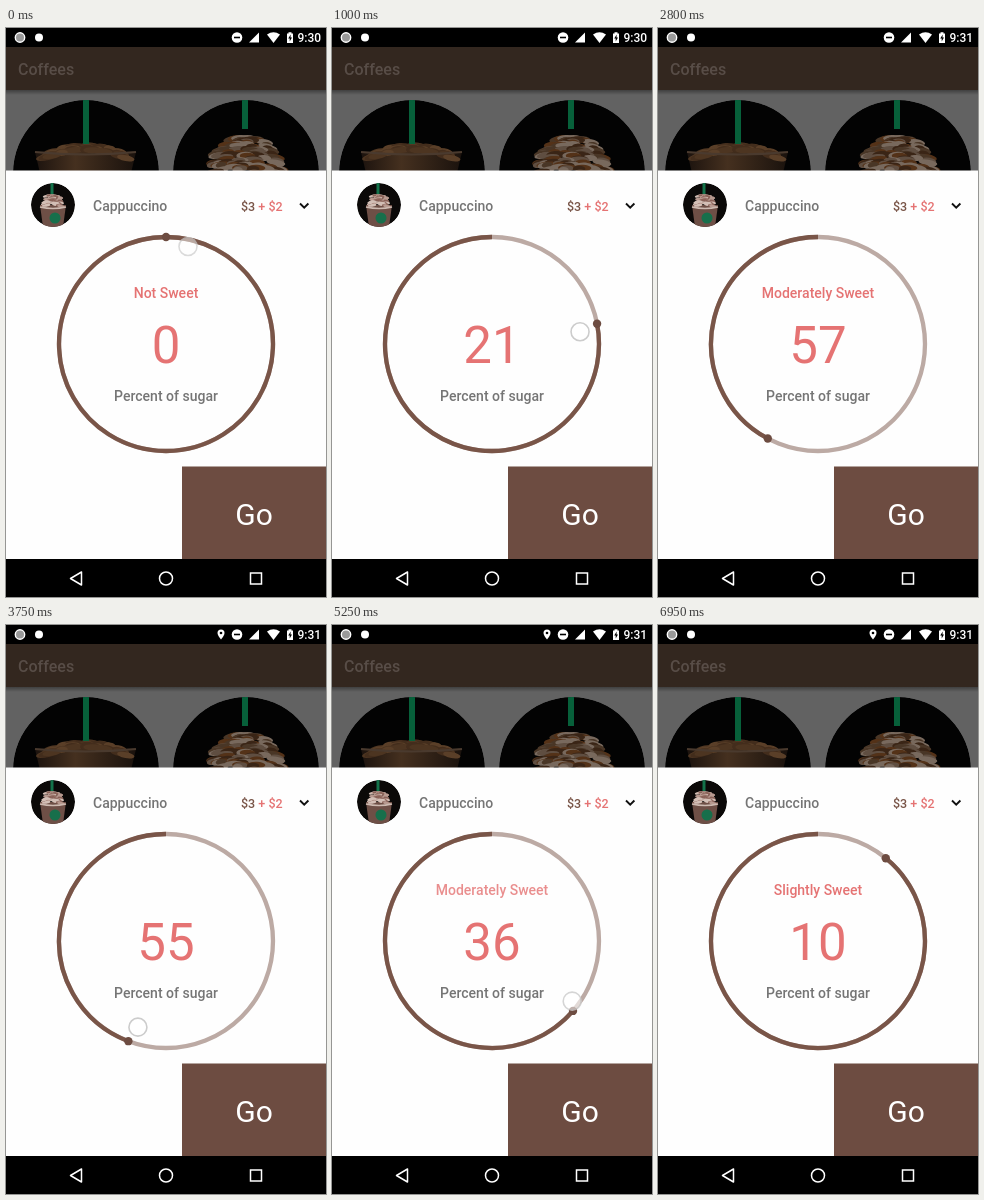
Recreate the animation shown at these times as an HTML page. Size 320 by 569 pixels, loop 8000 ms.

```html
<!DOCTYPE html>
<html lang="en">
<head>
<meta charset="utf-8">
<title>Coffee sugar dial</title>
<style>
  html, body { margin: 0; width: 100%; height: 100%; overflow: hidden; background: #000; }
  svg { display: block; width: 100vw; height: 100vh; }
  text { font-family: Roboto, "Noto Sans", sans-serif; }
  .medium { font-weight: 500; font-size: 14px; }
  .middle { text-anchor: middle; }
</style>
</head>
<body>
<svg viewBox="0 0 320 569" xmlns="http://www.w3.org/2000/svg">
  <defs>
    <clipPath id="disc"><circle r="73"/></clipPath>
    <clipPath id="smallDisc"><circle r="22"/></clipPath>
    <linearGradient id="shade" x2="0" y2="1">
      <stop stop-opacity=".35"/><stop offset="1" stop-opacity="0"/>
    </linearGradient>
    <linearGradient id="drink">
      <stop stop-color="#1c130e"/><stop offset=".4" stop-color="#45301f"/><stop offset="1" stop-color="#1a120d"/>
    </linearGradient>
  </defs>

  <!-- dimmed list -->
  <rect y="19" width="320" height="124" fill="#626262"/>
  <rect y="62" width="320" height="5" fill="url(#shade)"/>
  <rect y="19" width="320" height="43" fill="#33271f"/>
  <text x="12" y="46.5" font-size="16" font-weight="500" fill="#584d47">Coffees</text>

  <g transform="translate(80 145)" clip-path="url(#disc)">
    <circle r="73" fill="#030303"/>
    <path d="M-51 -21H50L45 0H-46Z" fill="url(#drink)"/>
    <g id="foam"></g>
    <path d="M-51 -21Q0 -16 50 -21" fill="none" stroke="#4a3a2e" stroke-width="2"/>
    <rect x="-3" y="-75" width="6" height="46" fill="#07603a"/>
  </g>
  <g transform="translate(240 145)" clip-path="url(#disc)">
    <circle r="73" fill="#030303"/>
    <g id="caramel"></g>
    <rect x="-4" y="-75" width="6" height="31" fill="#07603a"/>
  </g>

  <!-- status bar -->
  <g fill="#fff">
    <circle cx="14" cy="9.5" r="4.7" fill="#999" stroke="#fff" stroke-width="1.4"/>
    <circle cx="33" cy="9.5" r="4"/>
    <g id="pin">
      <path d="M211.500 8a3.500 3.500 0 0 1 7 0q0 2-3.500 6.500q-3.500-4.500-3.500-6.500"/>
      <circle cx="215" cy="8" r="1.300" fill="#000"/>
    </g>
    <circle cx="231" cy="9.500" r="5.300"/>
    <path d="M228 9.500h6" stroke="#000" stroke-width="1.600"/>
    <path d="M253 4.500v10h-10z"/>
    <path d="M261 6.500q6.500-4.500 13 0l-6.500 8.500z"/>
    <path d="M281 5.500h1.500v-1.200h3v1.200h1.500v9.500h-6z"/>
    <path d="M284.700 6.500l-2.500 4h1.500v3l2.300-4h-1.500z" fill="#000"/>
    <text id="clock" x="291.500" y="13.700" font-size="12" font-weight="500"></text>
  </g>

  <!-- order sheet -->
  <rect y="142.500" width="320" height="388.500" fill="#fefefe"/>
  <g transform="translate(47 177)" clip-path="url(#smallDisc)">
    <circle r="22" fill="#0b0908"/>
    <rect x="-2.500" y="-22" width="3" height="12" fill="#13724a"/>
    <path d="M-13 0H13L10 22H-10Z" fill="#6e4f46"/>
    <g id="whip"></g>
    <path d="M-13 2Q0 5 13 2" fill="none" stroke="#cdb9b0" stroke-width="1.500"/>
    <circle cx="2" cy="13" r="5.500" fill="#176f4b"/>
  </g>
  <text class="medium" x="87" y="182.700" fill="#757575">Cappuccino</text>
  <text x="235" y="182.700" font-size="12.500" font-weight="500" fill="#795548">$3 <tspan fill="#e57373">+ $2</tspan></text>
  <path d="M294 175.500l4.200 4.200 4.200-4.200" fill="none" stroke="#111" stroke-width="1.900"/>

  <!-- dial -->
  <g fill="none" stroke-width="4.300">
    <circle cx="160" cy="316" r="107" stroke="#bcaaa4"/>
    <path id="arc" stroke="#795548"/>
  </g>
  <circle id="knob" r="4.200" fill="#6d4c41"/>
  <text id="label" class="medium middle" x="160" y="269.700" fill="#e57373"></text>
  <text id="value" class="middle" x="160" y="334.500" font-size="51" fill="#e57373"></text>
  <text class="medium middle" x="160" y="372.700" fill="#757575">Percent of sugar</text>
  <rect x="176" y="438.500" width="144" height="92.500" fill="#6d4c41"/>
  <text class="middle" x="248" y="496.500" font-size="30" fill="#fff">Go</text>
  <circle id="touch" r="9" fill="#fff" fill-opacity=".7" stroke="#ccc" stroke-width="1.600"/>

  <!-- navigation bar -->
  <rect y="531" width="320" height="38"/>
  <g fill="none" stroke="#fff" stroke-width="1.500">
    <path d="M75.500 544v13l-11-6.500z" stroke-linejoin="round"/>
    <circle cx="160" cy="550.500" r="6.500"/>
    <rect x="244.500" y="545" width="11" height="11"/>
  </g>
</svg>
<script>
const LOOP = 8000, STEP = 50, LAG = 30, CX = 160, CY = 316, R = 107;
const el = id => document.getElementById(id);
const [arc, knob, label, value, touch, pin, clock] =
  ["arc", "knob", "label", "value", "touch", "pin", "clock"].map(el);

const clamp = x => Math.min(1, Math.max(0, x));
const mix = (a, b, p) => a + (b - a) * p;
const bezier = ([a, b, c, d], p) =>
  mix(mix(mix(a, b, p), mix(b, c, p), p), mix(mix(b, c, p), mix(c, d, p), p), p);

// Each drag bends the finger's angle along a Bezier curve and drifts its distance from the centre.
const drags = [
  { start: 0, end: 2700, rest: 0, curve: [12.7, 31.6, 210, 208], reach: [100, 70], before: "Not Sweet", after: "Moderately Sweet" },
  { start: 3570, end: 4420, rest: 208, curve: [208, 204, 136, 130.8], reach: [90, 93], before: "Moderately Sweet", after: "Moderately Sweet" },
  { start: 5220, end: 6770, rest: 130.8, curve: [130.8, 62.3, 39.3, 39.3], reach: [100, 112], before: "Moderately Sweet", after: "Slightly Sweet" }
];

function progress(drag, t) {
  return clamp((t - drag.start) / (drag.end - drag.start));
}

function polar(degrees, radius) {
  const a = degrees * Math.PI / 180;
  return [CX + radius * Math.sin(a), CY - radius * Math.cos(a)];
}

function place(node, [x, y]) {
  node.setAttribute("cx", x);
  node.setAttribute("cy", y);
}

// Piles up random dabs, widening from the top of the heap to its bottom.
function heap(id, { top, bottom, narrow, wide, dab, count, colours }) {
  let seed = 7;
  const random = () => (seed = seed * 16807 % 2147483647) / 2147483647;
  for (let i = 0; i < count; i++) {
    const p = i / count;
    const side = 2 * random() - 1;
    const node = document.createElementNS("http://www.w3.org/2000/svg", "ellipse");
    place(node, [side * mix(narrow, wide, Math.sqrt(p)), mix(top, bottom, p)]);
    node.setAttribute("rx", dab * (1 + random()));
    node.setAttribute("ry", dab * .6);
    node.setAttribute("fill", colours[Math.floor(random() * colours.length)]);
    node.setAttribute("transform", `rotate(${side * 12})`);
    el(id).append(node);
  }
}

heap("foam", { top: -28, bottom: -22, narrow: 28, wide: 40, dab: 5, count: 50,
  colours: ["#4d3521", "#5a3f28", "#432d1c"] });
heap("caramel", { top: -36, bottom: 4, narrow: 6, wide: 44, dab: 5, count: 130,
  colours: ["#5f4e41", "#493626", "#543218", "#78695d", "#3a2516"] });
heap("whip", { top: -10, bottom: 0, narrow: 4, wide: 9, dab: 2.2, count: 50,
  colours: ["#d3bfb6", "#b89a90", "#8a6258"] });

function draw(t) {
  const drag = drags.findLast(d => t >= d.start);
  const finger = time => bezier(drag.curve, progress(drag, time));
  const angle = mix(drag.rest, finger(t - LAG), clamp((t - drag.start) / 150));
  const [x, y] = polar(Math.max(angle, .01), R);
  arc.setAttribute("d", `M${x} ${y}A${R} ${R} 0 ${angle < 180 ? 1 : 0} 1 ${CX} ${CY - R}`);
  place(knob, [x, y]);
  value.textContent = Math.floor(angle / 3.6);

  place(touch, polar(finger(t), mix(...drag.reach, progress(drag, t))));
  touch.setAttribute("opacity", clamp(.7 + (t - drag.start) / 300) * clamp(1 - (t - drag.end) / 80));

  const fadeOut = clamp(1 - (t - drag.start) / 150);
  const fadeIn = clamp((t - drag.end + 50) / 130);
  label.textContent = fadeOut > 0 ? drag.before : drag.after;
  label.setAttribute("opacity", Math.max(fadeOut, fadeIn));

  pin.setAttribute("opacity", t < 3300 ? 0 : 1);
  clock.textContent = t < 1350 ? "9:30" : "9:31";
}

const start = performance.now();
function tick() {
  const t = (performance.now() - start) % LOOP;
  draw(Math.floor(t / STEP) * STEP);
  requestAnimationFrame(tick);
}
tick();
</script>
</body>
</html>
```
